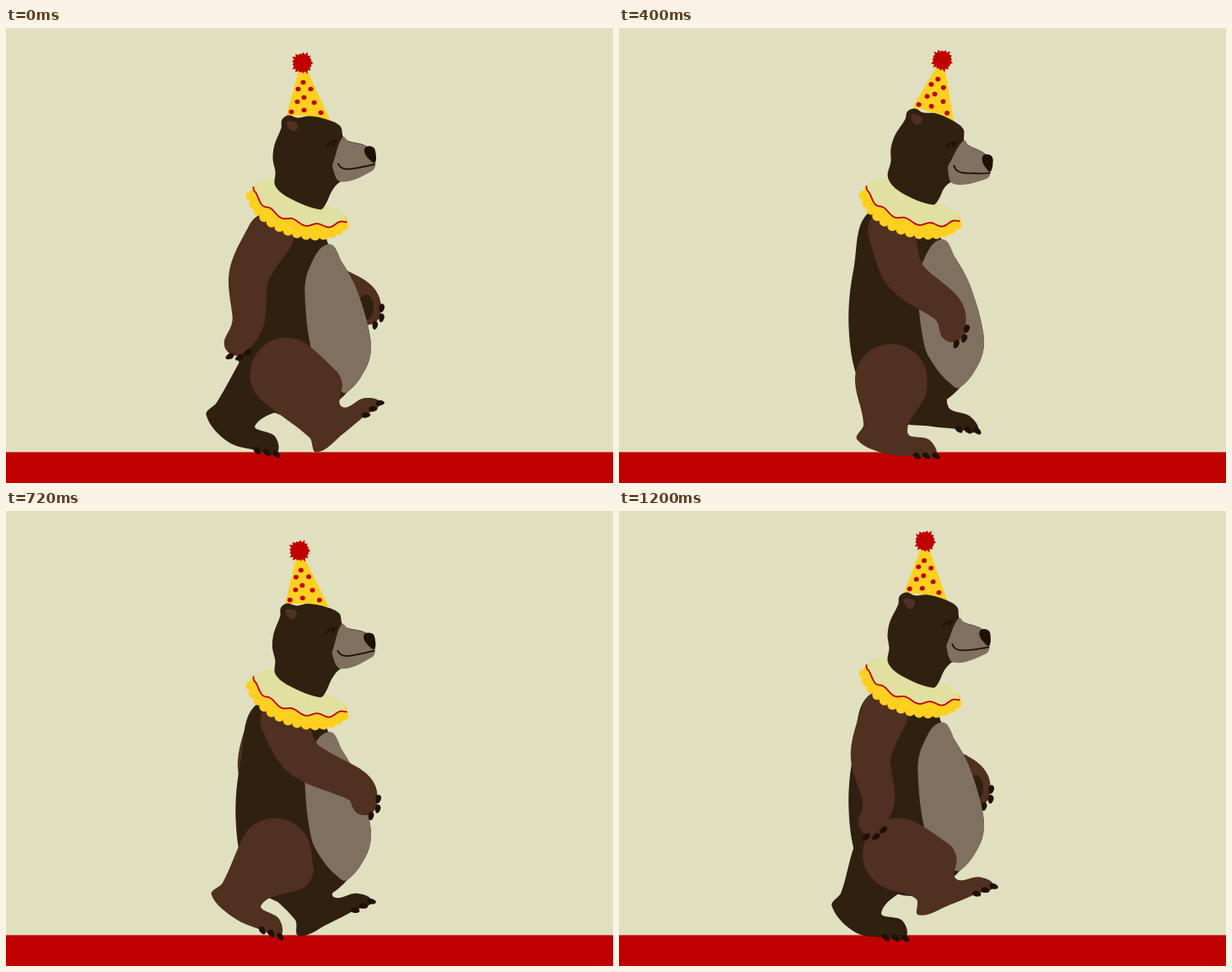
Animation, 720 px wide and 540 px high, one loop 1280 ms. Source, as an HTML page with a canvas:

```html
<!DOCTYPE html>
<html lang="en">
<head>
<meta charset="utf-8">
<title>Walking bear</title>
<style>
html, body { margin: 0; width: 100%; height: 100%; overflow: hidden; background: #e0e0c0; }
canvas { display: block; width: 720px; height: 540px; }
</style>
</head>
<body>
<canvas id="stage" width="720" height="540"></canvas>
<script>
const ctx = document.getElementById('stage').getContext('2d');
const { PI, sin, cos, atan2, acos, hypot, min, max, abs, floor } = Math;
const STEPS = 16, STEP_MS = 80;
const DARK = '#302010', BROWN = '#503020', GREY = '#807060', BLACK = '#201000';
const YELLOW = '#ffd020', PALE = '#e0e0a0', RED = '#c00000', SKY = '#e0e0c0';

const rad = deg => deg * PI / 180;
const mix = (a, b, f) => a.map((v, i) => v + (b[i] - v) * f);
const pairs = (...flat) => flat.flatMap((v, i) => i % 2 ? [] : [[v, flat[i + 1]]]);

// Two bobs and one head tilt per full cycle
const bob = s => 8 * sin(s * PI / 4);
const collarBob = s => 3.5 - 3.5 * cos(s * PI / 4) + 9.9 * sin(s * PI / 4);
const headTilt = s => 5 - 5 * cos(s * PI / 4) - 3.7 * sin(s * PI / 4);

// Foot keys: step, heel x, heel y, sole angle
const footKeys = [
  [0, 368, 503, -38], [3, 305, 505, 0], [5, 282, 488, 11], [8, 237, 459, 28],
  [11, 256, 447, 36], [12, 318, 458, 22], [15, 355, 479, -21], [16, 368, 503, -38]
];
// Shoulder, elbow, wrist and hand at the ends and middle of the arm swing
const armBack = pairs(313, 246, 288, 292, 287, 347, 273, 374);
const armMid = pairs(318, 246, 329, 305, 369, 350, 374, 380);
const armFront = pairs(330, 243, 354, 286, 418, 317, 429, 337);
const armWidth = [28, 24, 19, 15];

const chest = pairs(404,432, 428,400, 432,370, 416,311, 399,279, 382,256);
const belly = [...chest, ...pairs(359,285, 354,315, 362,383, 375,408, 390,425)];
const torso = [...chest, ...pairs(372,232, 299,222, 278,290, 272,360, 284,425, 310,452, 350,462, 385,448)];
const head = pairs(326,118, 327,108, 335,103, 345,106, 360,104, 380,108, 396,116, 401,131, 430,142,
  434,166, 396,182, 386,193, 379,208, 372,215, 335,201, 319,187, 319,170, 316,155, 318,138);
const muzzle = pairs(399,129, 406,134, 427,140, 436,150, 438,160, 434,169, 397,182, 387,165, 389,155);
const nose = pairs(426,141, 435,141, 438,148, 437,159, 431,156, 425,148);
const dots = pairs(352,64, 346,72, 361,72, 353,82, 345,87, 365,88, 338,99, 353,97, 373,100);

// Smooth curve through points, handle length follows segment length
function trace(p, closed = true) {
  const n = p.length;
  const at = i => closed ? p[(i + n) % n] : p[max(0, min(n - 1, i))];
  const tangent = i => {
    const a = at(i - 1), b = at(i + 1), d = hypot(b[0] - a[0], b[1] - a[1]) || 1;
    return [(b[0] - a[0]) / d, (b[1] - a[1]) / d];
  };
  ctx.beginPath();
  ctx.moveTo(...p[0]);
  for (let i = 0; i < (closed ? n : n - 1); i++) {
    const a = at(i), b = at(i + 1), s = tangent(i), e = tangent(i + 1);
    const h = hypot(b[0] - a[0], b[1] - a[1]) / 3;
    ctx.bezierCurveTo(a[0] + s[0] * h, a[1] + s[1] * h, b[0] - e[0] * h, b[1] - e[1] * h, b[0], b[1]);
  }
}

function fill(color) {
  ctx.fillStyle = color;
  ctx.fill();
}

function blob(points, color) {
  trace(points);
  fill(color);
}

function line(points, color, width) {
  trace(points, false);
  ctx.strokeStyle = color;
  ctx.lineWidth = width;
  ctx.stroke();
}

function disc(x, y, rx, ry, color) {
  ctx.beginPath();
  ctx.ellipse(x, y, rx, ry, 0, 0, 2 * PI);
  fill(color);
}

// Runs draw with the canvas turned around a pivot
function turned(x, y, deg, draw) {
  ctx.save();
  ctx.translate(x, y);
  ctx.rotate(rad(deg));
  ctx.translate(-x, -y);
  draw();
  ctx.restore();
}

function shifted(dy, draw) {
  ctx.save();
  ctx.translate(0, dy);
  draw();
  ctx.restore();
}

function claw(x, y, angle) {
  ctx.save();
  ctx.translate(x, y);
  ctx.rotate(angle);
  blob(pairs(5.5,1, 1,-3.2, -3.5,-2.7, -4.5,1, 0,3.2), BLACK);
  ctx.restore();
}

function arc([x, y], r, from, to) {
  return Array.from({ length: 9 }, (_, i) => {
    const a = from + (to - from) * i / 8;
    return [x + r * cos(a), y + r * sin(a)];
  });
}

// Angle on a circle where the tangent to a target leaves it
function tangentAngle(c, r, target, side) {
  const dx = target[0] - c[0], dy = target[1] - c[1];
  return atan2(dy, dx) + side * acos(min(1, r / hypot(dx, dy)));
}

function leg(step, color) {
  const a = step * PI / 8, hipR = 43, kneeR = 25;
  const hip = [325 + 7 * cos(a), 410 + 8 * sin(a)];
  const knee = [354 + 21 * cos(a + PI / 8), 424 + 11 * sin(a) + bob(step)];

  const next = footKeys.findIndex(k => k[0] > step);
  const k0 = footKeys[next - 1], k1 = footKeys[next];
  const [, hx, hy, deg] = mix(k0, k1, (step - k0[0]) / (k1[0] - k0[0]));
  const c = cos(rad(deg)), s = sin(rad(deg));
  const foot = (u, v) => [hx + u * c - v * s, hy + u * s + v * c];
  const push = max(0, sin((step - 4) * PI / 6)); // toes bend at push-off

  const heel = foot(4, -19), instep = foot(57, -24 + 8 * push);
  const tip = foot(95, 2 * push), ball = foot(73, 1 + 9 * push);
  const front = tangentAngle(hip, hipR - kneeR, knee, -1);
  blob([
    ...arc(hip, hipR, front, tangentAngle(hip, hipR, heel, 1) - 2 * PI),
    heel, foot(0, 0), foot(38, 2 + 16 * push), ball, tip, foot(84, -16), instep,
    ...arc(knee, kneeR, tangentAngle(knee, kneeR, instep, -1), front)
  ], color);

  const aim = atan2(tip[1] - ball[1], tip[0] - ball[0]) + 0.45;
  for (const f of [0, 0.5, 1]) claw(...mix(tip, ball, f), aim);
}

function arm(step, far) {
  const swing = 1 - abs(step - 8) / 4;
  const pose = armMid.map((p, i) => swing > 0
    ? mix(p, armFront[i], sin(swing * PI / 2))
    : mix(p, armBack[i], -swing));
  const joints = pose.map(([x, y], i) => [x, y + bob(step), armWidth[i]]);
  const [, , wrist, hand] = joints;

  // Sweep a circle of changing size along the joints
  ctx.beginPath();
  for (let t = 0; t <= 3; t += 0.04) {
    const i = min(2, floor(t)), f = t - i;
    const p1 = joints[i], p2 = joints[i + 1], p0 = joints[max(0, i - 1)], p3 = joints[min(3, i + 2)];
    const [x, y, r] = p1.map((v, j) => v + f / 2 * (p2[j] - p0[j]
      + f * (2 * p0[j] - 5 * v + 4 * p2[j] - p3[j] + f * (3 * (v - p2[j]) + p3[j] - p0[j]))));
    ctx.moveTo(x + r, y);
    ctx.arc(x, y, r, 0, 2 * PI);
  }
  fill(BROWN);
  if (far) disc((wrist[0] + hand[0]) / 2 + 3, (wrist[1] + hand[1]) / 2 + 4, 9, 15, DARK);

  const aim = atan2(hand[1] - wrist[1], hand[0] - wrist[0]);
  for (const a of [0, -0.7, -1.4]) {
    claw(hand[0] + 17 * cos(aim + a), hand[1] + 17 * sin(aim + a), aim + 0.45);
  }
}

const bezier = (p, t) => [0, 1].map(j =>
  p[0][j] * (1 - t) ** 3 + 3 * p[1][j] * t * (1 - t) ** 2 + 3 * p[2][j] * t * t * (1 - t) + p[3][j] * t ** 3);
const along = (p, n) => Array.from({ length: n + 1 }, (_, i) => bezier(p, i / n));

const ruffle = along(pairs(290,199, 300,240, 375,260, 400,234), 13);
const trim = along(pairs(293,186, 294,222, 372,246, 404,228), 40)
  .map(([x, y], i) => [x, y + 2.2 * cos(10 * PI * (i / 40 - 0.62))]);

function collar() {
  blob([...ruffle, ...pairs(404,225, 380,210, 318,181, 293,187)], YELLOW);
  for (const [x, y] of ruffle) disc(x, y, 6, 6, YELLOW);
  blob([...trim, ...pairs(395,216, 378,208, 345,190, 318,179, 302,182)], PALE);
  line(trim, RED, 1.8);
}

function hat() {
  ctx.beginPath();
  ctx.moveTo(347, 48);
  ctx.lineTo(356, 48);
  ctx.lineTo(384, 109);
  ctx.quadraticCurveTo(360, 102, 332, 104);
  fill(YELLOW);
  for (const [x, y] of dots) disc(x, y, 3, 2.8, RED);
  ctx.beginPath();
  for (let i = 0; i < 34; i++) {
    const r = i % 2 ? 10.5 : 13 + 1.5 * sin(i * 2.3), a = i * PI / 17;
    ctx.lineTo(351 + r * cos(a), 41 + r * sin(a));
  }
  fill(RED);
}

// Tilts the skull while the neck base stays put
function bend([x, y], deg) {
  const a = rad(deg) * max(0, min(1, (205 - y) / 35));
  const dx = x - 355, dy = y - 182;
  return [355 + dx * cos(a) - dy * sin(a), 182 + dx * sin(a) + dy * cos(a)];
}

function drawHead(tilt) {
  turned(355, 182, tilt, () => turned(358, 105, tilt * 0.36, hat));
  blob(head.map(p => bend(p, tilt)), DARK);
  turned(355, 182, tilt, () => {
    blob(pairs(332,112, 338,110, 346,114, 340,122), BROWN);
    blob(muzzle, GREY);
    blob(nose, BLACK);
    line(pairs(393,160, 397,165, 404,167, 424,164, 437,161), BLACK, 1.8);
    line(pairs(380,140, 385,135, 392,133), BLACK, 2);
    line(pairs(389,134, 388,139), BLACK, 3);
  });
}

function render(step) {
  const far = (step + 8) % STEPS;
  ctx.fillStyle = SKY;
  ctx.fillRect(0, 0, 720, 540);
  ctx.fillStyle = RED;
  ctx.fillRect(0, 503.4, 720, 37);

  ctx.save();
  ctx.translate(0.5, 0.5);
  arm(far, true);
  leg(far, DARK);
  shifted(bob(step), () => {
    blob(torso, DARK);
    blob(belly, GREY);
  });
  leg(step, BROWN);
  arm(step, false);
  shifted(collarBob(step), collar);
  shifted(bob(step), () => drawHead(headTilt(step)));
  ctx.restore();
}

const start = performance.now();
function tick() {
  render(floor((performance.now() - start) / STEP_MS) % STEPS);
  requestAnimationFrame(tick);
}
tick();
</script>
</body>
</html>
```
